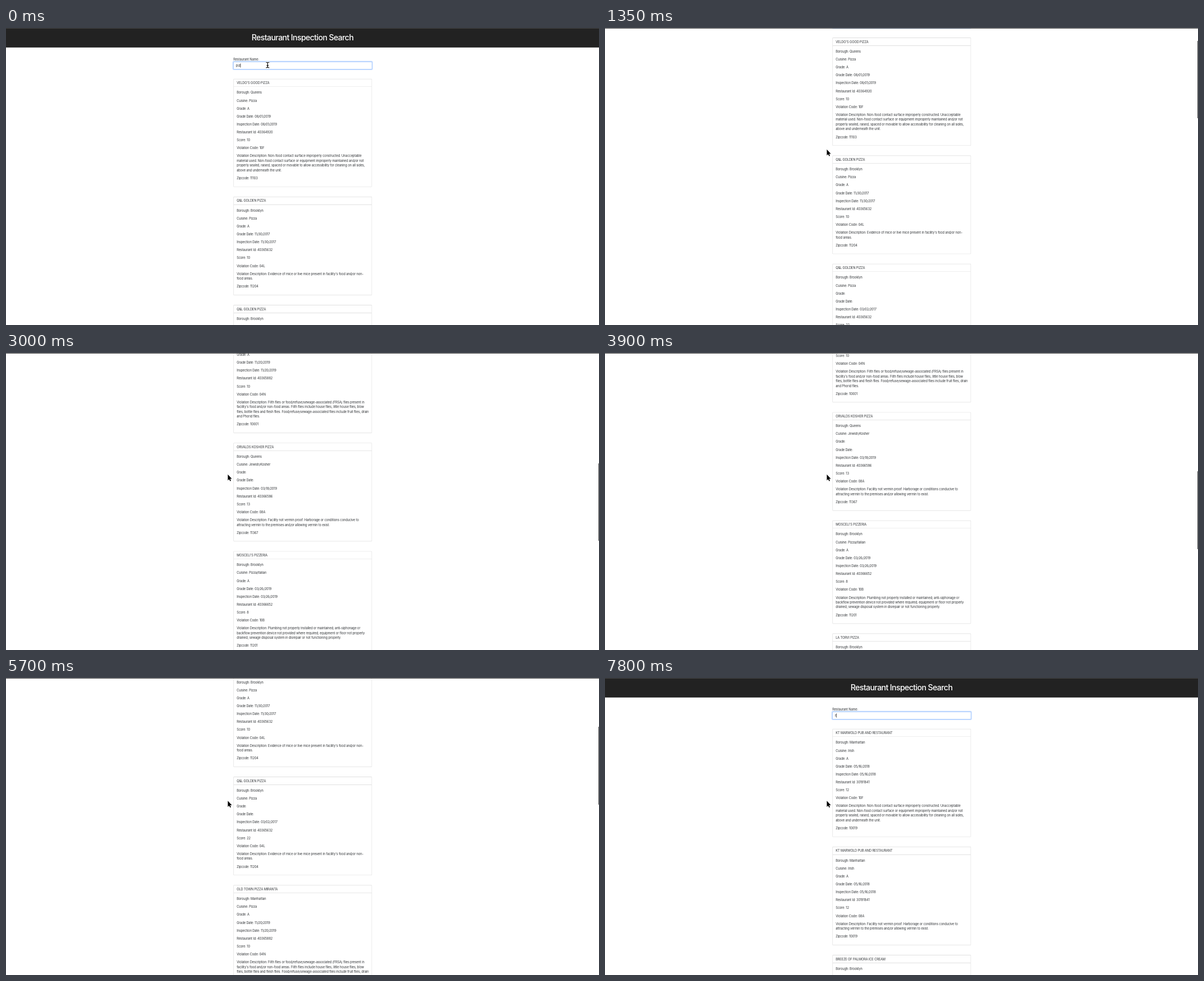
These frames come from a looping animation (1057x530 px, 8000 ms). An HTML page:

```html
<!DOCTYPE html>
<html lang="en">
<head>
<meta charset="utf-8">
<title>Restaurant Inspection Search</title>
<style>
  html, body { margin: 0; width: 100%; height: 100%; overflow: hidden; background: #fff; }
  #stage { position: relative; width: 1057px; height: 530px; overflow: hidden; }
  #stage > * { position: absolute; left: 0; top: 0; }
  /* The page is laid out at full size and shown zoomed out. */
  #page { width: 2992px; transform-origin: 0 0; color: #2f3235;
    font: 16px/24px Inter, sans-serif; letter-spacing: -.02em; white-space: pre; }
  header { height: 96px; background: #222; }
  h1 { margin: 0; position: relative; top: -2px; color: #fff; text-align: center;
    font-size: 40px; line-height: 96px; font-weight: 500; letter-spacing: -.043em; }
  main { position: relative; left: 1px; width: 700px; margin: 48px auto 0; }
  .field { box-sizing: border-box; height: 38px; padding: 7px 13px; border-radius: 4px;
    box-shadow: inset 0 0 0 2px #86b7fe, 0 0 0 4px rgba(13, 110, 253, .25); }
  #caret { display: inline-block; width: 2.5px; height: 20px; background: #000; vertical-align: -4px; }
  .card { margin-top: 48px; padding: 1px; border-radius: 4px; box-shadow: inset 0 0 0 2.5px #e0e0e0; }
  .title { height: 24px; padding: 8px 16px 9px; box-shadow: inset 0 -2.5px #e0e0e0; }
  .body { padding: 16px; }
  p { margin: 0 0 16px; }
  #edge { width: 1057px; height: 1px; background: #444; }
  #stage > #thumb { left: 1056px; width: 1px; height: 138.5px; background: #444; }
  svg { overflow: visible; }
  #beam { fill: none; stroke-linecap: round; }
  #arrow { stroke: #fff; stroke-width: 1.3; paint-order: stroke; }
</style>
</head>
<body>
<div id="stage">
  <div id="page"><header><h1>Restaurant Inspection Search</h1></header><main><div>Restaurant Name:</div><div class="field"><span id="query"></span><span id="caret"></span></div><div id="pizzaList"></div><div id="otherList"></div></main></div>
  <div id="edge"></div>
  <div id="thumb"></div>
  <svg width="1057" height="530">
    <defs><path id="beamShape" d="M-2.6-4.8Q0-4.8 0-3V3Q0 4.8-2.6 4.8M2.6-4.8Q0-4.8 0-3V3Q0 4.8 2.6 4.8M-1.3.9H1.3"/></defs>
    <g id="beam" transform="translate(466.3 66)">
      <use href="#beamShape" stroke="#fff" stroke-width="2.2"/>
      <use href="#beamShape" stroke="#000" stroke-width="1.1"/>
    </g>
    <path id="arrow" d="M0 0V10.6L2.4 8.4 4 12 5.6 11.3 4.1 7.8H7.2Z"/>
  </svg>
</div>
<script>
const $ = id => document.getElementById(id);
const SCALE = 1057 / 2992, LOOP = 8000, STEP = 150;

const violations = {
  '10F': 'Non-food contact surface improperly constructed. Unacceptable\nmaterial used. Non-food contact surface or equipment improperly maintained and/or not\nproperly sealed, raised, spaced or movable to allow accessibility for cleaning on all sides,\nabove and underneath the unit.',
  '04L': "Evidence of mice or live mice present in facility's food and/or non-\nfood areas.",
  '04N': "Filth flies or food/refuse/sewage-associated (FRSA) flies present in\nfacility's food and/or non-food areas. Filth flies include house flies, little house flies, blow\nflies, bottle flies and flesh flies. Food/refuse/sewage-associated flies include fruit flies, drain\nand Phorid flies.",
  '08A': 'Facility not vermin proof. Harborage or conditions conducive to\nattracting vermin to the premises and/or allowing vermin to exist.',
  '10B': 'Plumbing not properly installed or maintained; anti-siphonage or\nbackflow prevention device not provided where required; equipment or floor not properly\ndrained; sewage disposal system in disrepair or not functioning properly.'
};

// name | borough | cuisine | grade | inspection date | id | score | violation | zipcode
const pizza = `VELDO'S GOOD PIZZA|Queens|Pizza|A|08/01/2019|40364920|10|10F|11103
Q&L GOLDEN PIZZA|Brooklyn|Pizza|A|11/30/2017|40365632|10|04L|11204
Q&L GOLDEN PIZZA|Brooklyn|Pizza||03/02/2017|40365632|22|04L|11204
OLD TOWN PIZZA MIRANTA|Manhattan|Pizza|A|11/20/2019|40365882|10|04N|10001
ORVALDS KOSHER PIZZA|Queens|Jewish/Kosher||03/18/2019|40366586|13|08A|11367
MOSCELI'S PIZZERIA|Brooklyn|Pizza/Italian|A|03/26/2019|40366652|8|10B|11201
LA TORVI PIZZA|Brooklyn|Pizza/Italian|A|03/26/2019|40366661|10|10F|11204`;
const other = `KT MARWOLD PUB AND RESTAURANT|Manhattan|Irish|A|05/16/2018|30191841|12|10F|10019
KT MARWOLD PUB AND RESTAURANT|Manhattan|Irish|A|05/16/2018|30191841|12|08A|10019
BREEZE OF PALMORA ICE CREAM|Brooklyn|Ice Cream|A|05/16/2018|40356731|10|10F|11226`;

function add(parent, tag, className, text = '') {
  const el = parent.appendChild(document.createElement(tag));
  el.className = className;
  el.textContent = text;
  return el;
}

function fillList(list, rows) {
  for (const row of rows.split('\n')) {
    const [name, borough, cuisine, grade, date, id, score, code, zip] = row.split('|');
    const card = add(list, 'div', 'card');
    add(card, 'div', 'title', name);
    const body = add(card, 'div', 'body');
    const fields = {
      'Borough': borough, 'Cuisine': cuisine, 'Grade': grade, 'Grade Date': grade && date,
      'Inspection Date': date, 'Restaurant Id': id, 'Score': score, 'Violation Code': code,
      'Violation Description': violations[code], 'Zipcode': zip
    };
    for (const key in fields) add(body, 'p', '', `${key}: ${fields[key]}`);
  }
}
fillList($('pizzaList'), pizza);
fillList($('otherList'), other);

// [time, scroll offset], joined by a monotone cubic curve
const scrollKeys = [[0, 0], [750, 0], [1350, 73.5], [2250, 370.9], [3300, 800], [3750, 800],
  [3900, 792.1], [4950, 470], [5100, 470], [5700, 318], [6150, 2], [6300, -.9], [6600, -.3],
  [6900, 0], [LOOP, 0]];
const slope = i => {
  const a = scrollKeys[i], b = scrollKeys[i + 1];
  return a && b ? (b[1] - a[1]) / (b[0] - a[0]) : 0;
};
const tangent = i => {
  const a = slope(i - 1), b = slope(i);
  return a * b > 0 ? 2 * a * b / (a + b) : 0;
};
function scrollAt(t) {
  const i = scrollKeys.findIndex((key, n) => t < scrollKeys[n + 1][0]);
  const [t0, y0] = scrollKeys[i], [t1, y1] = scrollKeys[i + 1];
  const d = t1 - t0, u = (t - t0) / d, v = 1 - u;
  return v * v * (1 + 2 * u) * y0 + u * u * (3 - 2 * u) * y1
    + d * u * v * (v * tangent(i) - u * tangent(i + 1));
}

const show = (id, on) => $(id).style.display = on ? '' : 'none';

function draw() {
  const now = performance.now() % LOOP;
  const t = Math.min(Math.floor(now / STEP) * STEP, 7800);
  const y = scrollAt(t);
  $('page').style.transform = `translateY(${.87 - y}px) scale(${SCALE})`;
  $('thumb').style.top = 3.7 + .262 * Math.max(y, 0) + 'px';
  show('thumb', t >= 900 && t < 7050);

  $('query').textContent = t < 7200 ? 'piz' : t < 7350 ? 'pi' : t < 7500 ? 'p' : t < 7650 ? '' : 'r';
  $('caret').style.opacity = +(t < 150 || t >= 600 && t < 1050 || t >= 6900);
  show('pizzaList', t < 7800);
  show('otherList', t >= 7800);

  show('beam', t < 450);
  show('arrow', t >= 450);
  const [ax, ay] = t < 600 ? [425, 150] : [395.4, t < 5250 ? 216.8 : 219.3];
  $('arrow').setAttribute('transform', `translate(${ax} ${ay})`);
  requestAnimationFrame(draw);
}
draw();
</script>
</body>
</html>
```
